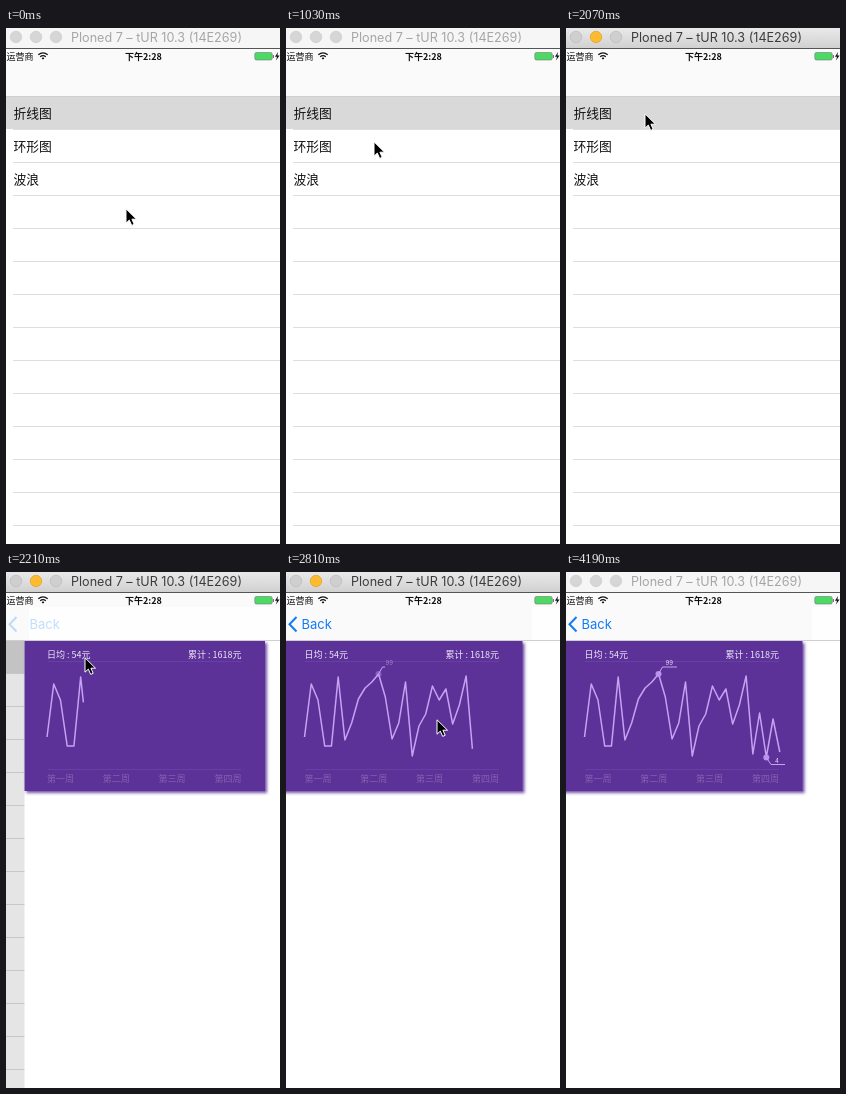
Write an HTML page that moves like this. It is 274 px wide and 516 px high and loops after 4240 ms.

```html
<!DOCTYPE html>
<html lang="zh">
<head>
<meta charset="utf-8">
<style>
  html, body { margin: 0; width: 100%; height: 100%; overflow: hidden; background: #fff; }
  svg { display: block; width: 274px; height: 516px; }
  text { font-family: "Noto Sans CJK SC", "Noto Sans CJK", sans-serif; }
  .title { font: 12.6px Inter, sans-serif; }
  .cell { font-size: 12.8px; fill: #111; }
  .status { font-size: 9px; fill: #111; }
  .card text { font-size: 9px; fill: #eee6f8; }
  .card .week { fill: #8361b2; }
  .card .tag { font: 6px Inter, sans-serif; fill: #e8dcfa; }
  .card path, .card polyline { fill: none; stroke: #c6a2f4; stroke-linejoin: round; }
  .back { font: 13px Inter, sans-serif; fill: #127cf6; }
</style>
</head>
<body>
<svg viewBox="0 0 274 516">
  <defs>
    <linearGradient id="bar" x2="0" y2="1">
      <stop stop-color="#e9e9e9"/><stop offset="1" stop-color="#d1d1d1"/>
    </linearGradient>
    <filter id="shadow" x="-10%" y="-10%" width="120%" height="120%">
      <feDropShadow dx="2" dy="2" stdDeviation="1.4" flood-color="#5b3398" flood-opacity=".85"/>
    </filter>
    <clipPath id="below"><rect y="69" width="274" height="447"/></clipPath>
  </defs>
  <rect width="274" height="516" fill="#fff"/>
  <rect y="21" width="274" height="48" fill="#fafafa"/>
  <rect id="navGap" x="246" y="35" width="28" height="33" fill="#fefefe"/>

  <g id="list">
    <rect id="selected" y="69" width="274" height="32" fill="#d9d9d9"/>
    <g id="cells"></g>
  </g>
  <rect id="dim" y="69" width="274" height="447" opacity=".1"/>

  <g clip-path="url(#below)">
    <g id="page">
      <rect x="-4" y="69" width="282" height="447" fill="#fff"/>
      <g class="card">
        <rect x="-4" y="69" width="240.5" height="150" fill="#5b3398" filter="url(#shadow)"/>
        <path d="M19 89.5H213M19 197.5H213" style="stroke:#6d47a8;stroke-width:.7"/>
        <text x="18.5" y="86">日均 : 54元</text>
        <text x="213" y="86" text-anchor="end">累计 : 1618元</text>
        <g id="weeks"></g>
        <polyline id="graph" pathLength="1" stroke-width="1.5"/>
        <g id="high">
          <circle cx="92.5" cy="102" r="3" fill="#b892ee"/>
          <path pathLength="1" d="M92.5 102L96.5 95H111"/>
          <text class="tag" x="99.5" y="93.3">99</text>
        </g>
        <g id="low">
          <circle cx="200.3" cy="185.5" r="3" fill="#b892ee"/>
          <path pathLength="1" d="M200.3 185.5L205 192.5H219"/>
          <text class="tag" x="209" y="191">4</text>
        </g>
      </g>
    </g>
  </g>
  <path d="M0 68.5H274" stroke="#cfcfd1"/>

  <g id="nav" class="back">
    <path d="M10.5 45L3.5 52.2L10.5 59.5" fill="none" stroke="#127cf6" stroke-width="2"/>
    <text id="backText" class="back" y="57">Back</text>
  </g>

  <text class="status" x=".5" y="31.5">运营商</text>
  <g fill="none" stroke="#111" stroke-width="1.3">
    <path d="M32.3 26.8Q37 22.8 41.7 26.8M34.2 28.8Q37 26.5 39.8 28.8"/>
    <path d="M36 30L37 31.2L38 30Z" fill="#111" stroke-width=".8"/>
  </g>
  <text class="status" x="137.5" y="31.5" text-anchor="middle" font-weight="700">下午2:28</text>
  <rect x="248.8" y="24.5" width="17.4" height="7.5" rx="1.5" fill="#4cd964" stroke="#777" stroke-width=".6"/>
  <path d="M267.3 27V30" stroke="#555"/>
  <path d="M272 24L269 28.8H271L270 32.5L273.6 27.5H271.4Z" fill="#111"/>

  <rect id="titleBar" width="274" height="20"/>
  <path d="M0 20.5H274" stroke="#555"/>
  <g id="buttons" stroke-width=".7"></g>
  <text id="title" class="title" x="65" y="14">Ploned 7 – tUR 10.3 (14E269)</text>

  <path id="pointer" d="M1 .8V15.2L4.3 12.1L6.7 17.4L9.2 16.3L6.9 11.2H11.5Z" fill="#000" stroke="#fff" stroke-width="1"/>
</svg>
<script>
  const LOOP = 4240;
  const $ = id => document.getElementById(id);
  const clamp = v => Math.min(1, Math.max(0, v));

  // The screen refreshes only at these moments.
  const refreshes = [0, 140, 290, 440, 590, 730, 880, 1030, 1180, 1330, 1620, 2070, 2210, 2360,
    2510, 2660, 2810, 2950, 3100, 3250, 3400, 3550, 3690, 3840, 4190];

  // Pointer position at successive refreshes.
  const pointer = [[119, 180], [115, 205], [194, 381], [187, 385], [153, 301], [152, 274],
    [111, 155], [87, 113], [77, 92], [77, 87], [78, 85], [78, 85], [78, 85], [95, 108],
    [138, 138], [150, 147], [150, 147], [170, 165], [229, 300], [242, 441]];

  const heights = [165, 112, 128, 174, 174, 105, 168, 151, 127, 116, 110, 102, 125, 167, 151,
    110, 184, 154, 142, 114, 128, 117, 152, 133, 104, 182, 141, 185, 147, 180];

  const labels = ['折线图', '环形图', '波浪'];
  for (let i = 0; i < 13; i++) {
    const y = 101.5 + 33 * i;
    $('cells').innerHTML += `<path d="M7 ${y}H274" stroke="#dedee0"/>` +
      (labels[i] ? `<text class="cell" x="7.5" y="${y - 12}">${labels[i]}</text>` : '');
  }
  [...'一二三四'].forEach((n, i) => {
    $('weeks').innerHTML += `<text class="week" x="${18.5 + 55.8 * i}" y="210">第${n}周</text>`;
  });
  for (const x of [10, 30, 50]) $('buttons').innerHTML += `<circle cx="${x}" cy="9" r="5.7"/>`;
  $('graph').setAttribute('points', heights.map((y, i) => `${18.5 + 6.734 * i},${y}`).join(' '));

  const show = (el, on) => { el.style.display = on ? '' : 'none'; };
  const reveal = (el, p) => {
    show(el, p > 0);
    el.style.strokeDasharray = p < 1 ? `${p} 2` : 'none';
  };

  function callout(id, start, t) {
    const p = clamp((t - start) / 1000), group = $(id);
    show(group, p > 0);
    group.querySelector('circle').style.opacity = p;
    group.querySelector('text').style.opacity = p;
    reveal(group.querySelector('path'), p);
  }

  function drawTitleBar(active) {
    $('titleBar').setAttribute('fill', active ? 'url(#bar)' : '#f6f6f6');
    $('title').style.fill = active ? '#3c3c3c' : '#a6a6a6';
    [...$('buttons').children].forEach((dot, i) => {
      const amber = active && i === 1;
      dot.setAttribute('fill', amber ? '#fdbc2f' : active ? '#cfcfcf' : '#d6d6d6');
      dot.setAttribute('stroke', amber ? '#dfa023' : active ? '#b9b9b9' : '#cbcbcb');
    });
  }

  function drawPush(t) {
    const pushed = t >= 2210, sliding = pushed && t < 2360;
    const offset = sliding ? 22.5 : t < 2510 ? 1.5 : 0;
    show($('page'), pushed);
    show($('nav'), pushed);
    show($('dim'), sliding);
    show($('navGap'), pushed);
    $('navGap').setAttribute('x', sliding ? 23 : 246);
    $('navGap').setAttribute('width', sliding ? 251 : 28);
    $('page').setAttribute('transform', `translate(${offset})`);
    $('list').setAttribute('transform', `translate(${pushed ? -77 : 0})`);
    $('nav').style.opacity = sliding ? .25 : 1;
    $('backText').setAttribute('x', sliding ? 23.5 : 15.5);
  }

  function frame(now) {
    const time = now % LOOP;
    const step = refreshes.findLastIndex(r => r <= time);
    const t = refreshes[step];
    drawTitleBar(t >= 2070 && t < 4190);
    drawPush(t);
    reveal($('graph'), clamp((t - 1981) / 1000));
    callout('high', 2340, t);
    callout('low', 2850, t);
    const at = pointer[step];
    show($('pointer'), at);
    if (at) $('pointer').setAttribute('transform', `translate(${at})`);
    requestAnimationFrame(frame);
  }

  const begin = performance.now();
  const tick = () => Math.max(0, performance.now() - begin);
  const schedule = requestAnimationFrame.bind(window);
  window.requestAnimationFrame = draw => schedule(() => draw(tick()));
  frame(0);
</script>
</body>
</html>
```
